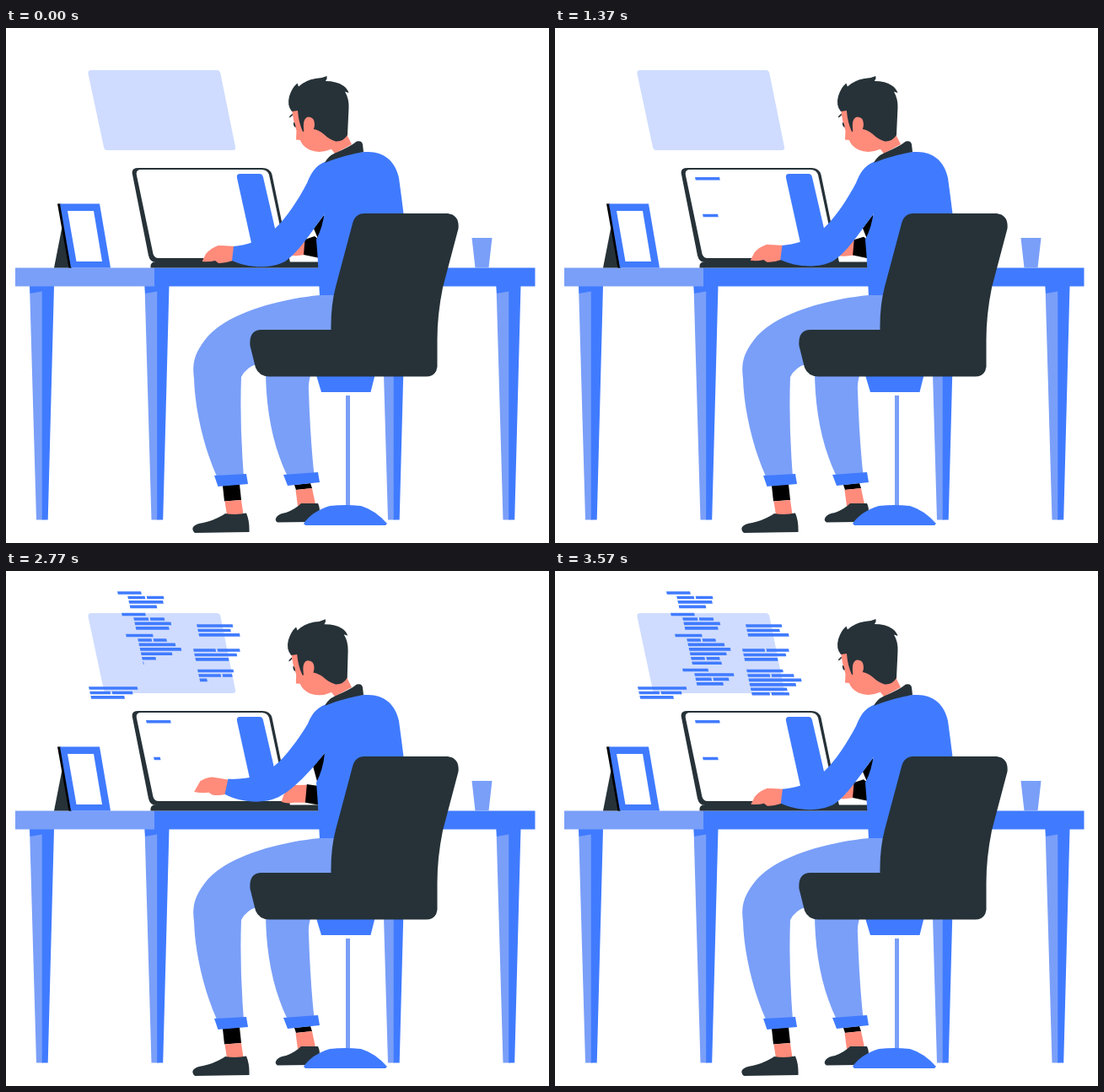
An HTML page for the animation above (3.61 s loop, 644x611 px).

```html
<!DOCTYPE html>
<html lang="en">
<head>
<meta charset="utf-8">
<title>Working at a desk</title>
<style>
  html, body { margin: 0; width: 100%; height: 100%; overflow: hidden; background: #fff; }
  svg { display: block; width: 644px; height: 611px; background: #fff; }
  svg.dark { background: #000; }
  svg.dark #scene { filter: drop-shadow(0 0 .4px #fff) drop-shadow(0 0 .3px #fff); }
  .blue { fill: #407bff; }
  .light { fill: #7a9ff8; }
  .pale { fill: #cfdcff; }
  .ink { fill: #263238; }
  .skin { fill: #ff8b7b; }
</style>
</head>
<body>
<svg viewBox="0 0 644 611">
  <defs>
    <g id="leg">
      <path class="light" d="M0 306H16V583.5H8Z"/>
      <path class="blue" d="M0 306H29L21.7 583.5H14.7V312.5L.6 315Z"/>
    </g>
  </defs>
  <g id="scene">
    <path class="pale" d="M101 50H250Q253.5 50 254.3 53.5L272 141Q272.8 145 269 145H120Q116.8 145 116 141.5L97.5 54.5Q96.8 50 101 50Z"/>
    <g id="code" class="blue"></g>

    <use href="#leg" x="28"/><use href="#leg" x="164.5"/>
    <use href="#leg" x="445"/><use href="#leg" x="581.5"/>
    <path class="light" d="M11 284.4H177V306.4H11Z"/>
    <path class="blue" d="M176 284.4H627.5V306.4H176Z"/>
    <path class="light" d="M552.5 249H576.5L572.5 284.5H556.5Z"/>

    <path class="ink" d="M66.5 236L57 284.5H78Z"/>
    <path d="M61 208.5H65L78 284.5H74.5Z"/>
    <path class="blue" fill-rule="evenodd" d="M64 208.5H111L124 284.5H77ZM73 217L83.5 277H114L104 217Z"/>

    <path class="ink" fill-rule="evenodd" d="M150 174Q148 166 157 166H304Q313 166 315.5 174L337 278H178Q171 278 169 270ZM155 175Q153.5 168 160 168H303Q310 168 312 174L333 273H181Q176 273 174.5 268Z"/>
    <path class="ink" d="M171.5 284.4V282Q172 277.5 177 277.5H372V284.4Z"/>
    <path class="blue" d="M277.5 173H301Q304 173 305 177L323 255H291L274 178Q273 173 277.5 173Z"/>
    <g id="screen" class="blue"></g>

    <path id="farHand" class="skin"/>
    <path id="farSleeve"/>
    <path id="farArm"/>
    <path class="blue" d="M380 157Q402 146 430 147C448 147 462 158 466 178Q469 200 472 224V318H372L369.5 270L368 251Q376 236 378 216L370 180Z"/>
    <path id="hand" class="skin"/>
    <path id="arm" class="blue"/>

    <path class="skin" d="M383 140L390 149L410 138L404 126L386 130Z"/>
    <path class="ink" d="M378 160Q382 152 390 148.5Q408 141 416 134.5Q422 133 423 138L424 147Q400 151 378 160Z"/>
    <g id="head">
      <path class="skin" d="M339 97L341 109L344.5 122L344 132.5L349 133Q351 140 360 144.5Q372 149.5 385 144L404 132L380 105L347 96Z"/>
      <path class="ink" d="M339 99Q333 92 336 81Q339 71 345.5 65.5L347 69.5Q355 62 367 60Q374 60 380.5 57Q381.5 60 379 63Q392 63 400 68.5Q405 72 406.5 77L402 75.5Q407 84 406.5 95L405 127Q400 135 391 134.5Q383 132 377 126Q371 121 365 120L352 123Q347 112 346 98Z"/>
      <path class="skin" d="M353 119Q352 106 359 105.5Q366 106 366 114Q366 120 362 124L354 130Z"/>
      <path class="ink" d="M336 105L339.5 101.5L340 103.5L336.5 106.5ZM341 111.5Q343.5 113 343.5 118Q340.5 117 341 111.5Z"/>
    </g>

    <path class="light" d="M308 405H364Q358 418 359 430Q361 490 365.500 530H333C315 492 308 448 308 405Z"/>
    <path d="M342 542L361 540L363 546L344 548Z"/>
    <path class="skin" d="M343.5 548L363 546L367 565L346 567Z"/>
    <path class="ink" d="M321 580Q324 576 332 575Q343 571 350 564H370Q373 570 371.5 577L360 586L322 586.5Q318 584 321 580Z"/>
    <path class="blue" d="M329 530L370 527L372 539L334 543Z"/>

    <path class="light" d="M391 317H372C320 322 258 340 236 370C222 388 221 400 223 416C224 451 234 496 250 532H282Q277 470 279 414Q285 402 300 398H391Z"/>
    <path d="M257 543L277 541L279 560L259 561.5Z"/>
    <path class="skin" d="M259.5 561.5L279 560L281.5 577L262 578Z"/>
    <path class="ink" d="M222 592Q225 588 234 587Q248 584 260 576Q273 578 285 575.5Q289 585 288.5 598L224 599Q220 596 222 592Z"/>
    <path class="blue" d="M247 531L285 529L287 541L251.5 544Z"/>

    <path class="light" d="M403 436H408V568H403Z"/>
    <path class="blue" d="M353 588Q362 574 384 567Q402 565 421 567Q438 572 452 588L450 590H355Z"/>
    <path class="blue" d="M368 412H437.5L432.5 432H374Z"/>
    <path class="ink" d="M425 220H524Q538 222 536.5 238L518 308Q511.5 340 511.5 370V402Q510 413.5 498 413.5H312Q300 413 296 403L289.5 377Q288 358 303 358H385.5Q385 330 391 307L411 232Q414 220 425 220Z"/>
  </g>
</svg>
<script>
const LOOP = 3610, STROKES = 11, GROW = 290;
const $ = id => document.getElementById(id);
const svg = document.querySelector('svg');

// Each part's outline with the arm down and with the arm raised.
const poses = {
  arm: [
    'M380 158C366 163 361 174 357 184C347 203 333 225 319 238C308 249 291 257 270 259L268 276C285 284 312 287 331 277C348 265 362 242 377 222L392 190Z',
    'M380 158C366 163 362 172 358 181C347 199 332 220 317 232C306 242 288 247 263 246L259 264C275 273 303 277 322 268C342 258 362 236 378 216L392 190Z'],
  hand: [
    'M272 259L252 258Q243 261 237 268L232.5 277Q241 278 248 276L252 279Q260 279 269 276Z',
    'M264 247L244 243.5Q236 244 230 248L222.5 261Q232 263 240 262L244 264.5Q252 266 260 264Z'],
  farHand: [
    'M356 251L349 253Q342 258 339 264L335 269Q340 271 346 270L355 269Z',
    'M358 254L342 254Q334 259 329 265L326 274Q333 277 341 275L357 275Z'],
  farSleeve: [
    'M354.5 251L366 247L372 252L372 273L353 269Z',
    'M357 253L367 255L372 255L372 278L355 275Z'],
  farArm: [
    'M377 222L365 238L370 250L378 250Z',
    'M378 216L364 231L369 250L378 250Z']
};

const lines = [];
function addLine(parent, line) {
  const el = document.createElementNS('http://www.w3.org/2000/svg', 'path');
  $(parent).append(el);
  lines.push({ el, ...line });
}

// Typed rows lean with the panel; their lengths swing around the block's
// width, longest at row `peak`, and every fourth row is broken by a gap.
function addColumn(start, step, peak, split, blocks) {
  let n = 0;
  for (const { x, y, rows, width, indent = 0 } of blocks)
    for (let i = 0; i < rows; i++, n++) {
      const heading = indent && !i;
      const w = width * (heading ? .78 : 1 + .2 * Math.cos((n - peak) * 1.3));
      addLine('code', {
        x: x + 1.2 * i + (i ? indent : 0), y: y + 5.45 * i, w,
        gap: n % 4 === split && !heading ? w * .48 : 0,
        starts: [start + step * n]
      });
    }
}

addColumn(1536, 88, 11, 1, [
  { x: 132, y: 26, rows: 4, width: 36, indent: 11 },
  { x: 137, y: 51.5, rows: 4, width: 36, indent: 13 },
  { x: 142, y: 76.5, rows: 7, width: 41, indent: 13 },
  { x: 151, y: 117.5, rows: 4, width: 39, indent: 13 }
]);
addColumn(1814, 117, 8, 3, [
  { x: 226, y: 65, rows: 3, width: 48 },
  { x: 222, y: 94, rows: 3, width: 46 },
  { x: 227, y: 118.5, rows: 6, width: 52 }
]);
addColumn(1600, 100, 0, 1, [{ x: 98, y: 139, rows: 3, width: 48 }]);
addLine('screen', { x: 166, y: 178.7, w: 29, gap: 0, starts: [660, 2150] });
addLine('screen', { x: 175, y: 222.5, w: 18, gap: 0, starts: [1060, 2700] });

const bar = (x, y, w) => w > 0 ? `M${x} ${y - 1.8}h${w}l.8 3.6h${-w}z` : '';

function drawLine({ el, x, y, w, gap, starts }, t) {
  const start = starts.findLast(s => s <= t) ?? Infinity;
  const k = Math.max(0, Math.min(1, (t - start) / GROW));
  const shown = w * (1 - (1 - k) ** 2);
  const d = gap
    ? bar(x, y, Math.min(gap, shown)) + bar(x + gap + 2, y, shown - gap - 2)
    : bar(x, y, shown);
  el.setAttribute('d', d);
}

function mix(a, b, k) {
  const to = b.match(/[\d.]+/g);
  let i = 0;
  return a.replace(/[\d.]+/g, n => (+n + (to[i++] - n) * k).toFixed(2));
}

function draw(t) {
  const lift = Math.sin(Math.PI * STROKES * t / LOOP) ** 4;
  for (const id in poses) $(id).setAttribute('d', mix(...poses[id], lift));
  $('head').setAttribute('transform', `rotate(${-1.2 * lift} 392 140)`);
  lines.forEach(line => drawLine(line, t));
  const dark = t >= 3400 && t < 3430;
  svg.classList.toggle('dark', dark);
  document.body.style.background = dark ? '#000' : '#fff';
}

const begin = performance.now();
function tick() {
  draw((performance.now() - begin) % LOOP);
  requestAnimationFrame(tick);
}
tick();
</script>
</body>
</html>
```
